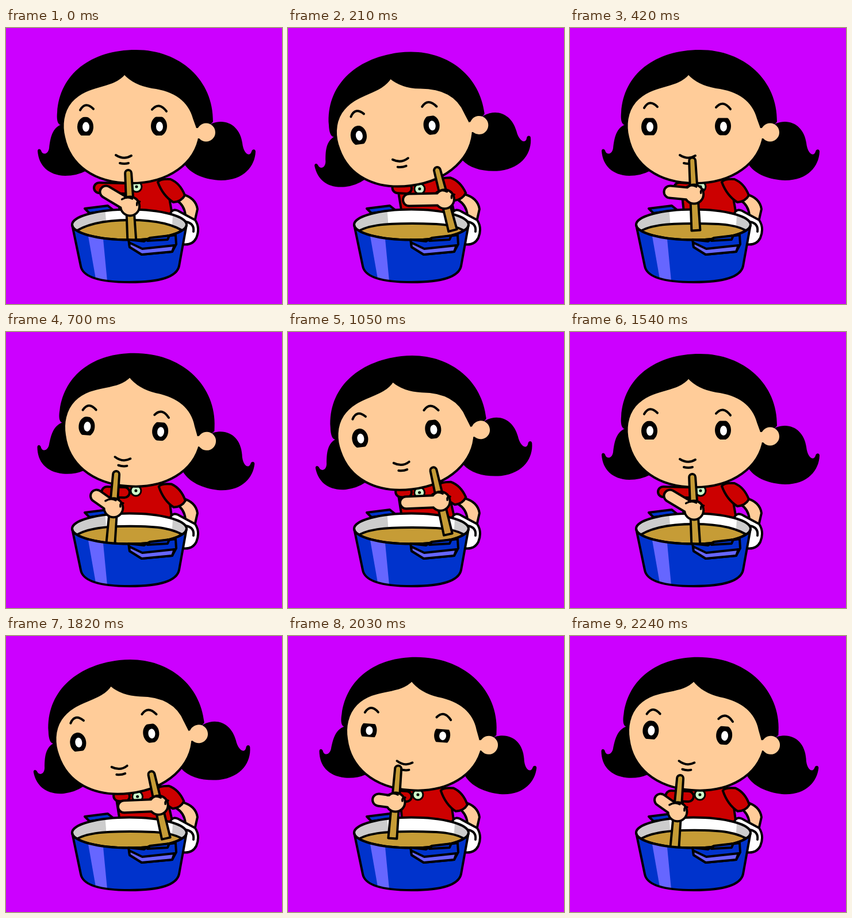
Write an HTML page that moves like this. It is 480 px wide and 480 px high and loops after 2310 ms.

```html
<!DOCTYPE html>
<html lang="en">
<head>
<meta charset="utf-8">
<title>Stirring the pot</title>
<style>
  html, body { margin: 0; width: 100%; height: 100%; overflow: hidden; background: #c0f; }
  svg { display: block; width: 100%; height: 100%; }
  .ink { stroke: #000; stroke-width: 4; stroke-linejoin: round; stroke-linecap: round; }
  .line { fill: none; }
  .skin { fill: #fc9; }
  .red { fill: #c00; }
  .blue { fill: #03c; }
  .light { fill: #66f; }
  .gold { fill: #c69c36; }
  .white { fill: #fff; }
  .limb { fill: none; stroke-linecap: round; }
</style>
</head>
<body>
<svg viewBox="0 0 480 480">
  <defs>
    <clipPath id="lids"><rect id="lidGap" x="100" width="200"/></clipPath>
    <clipPath id="rim"><ellipse cx="214.500" cy="342" rx="99" ry="26"/></clipPath>
  </defs>
  <rect width="480" height="480" fill="#c0f"/>

  <path class="ink skin" d="M306 289Q330 295 333 315L328 337L312 325Q310 308 297 300Z"/>
  <g id="torso">
    <path class="ink red" d="M192 262L199 330H290L283 290L270 262Z"/>
    <path class="ink red" d="M264 268Q268 262 286 263Q303 270 311 291Q305 302 291 303Q273 292 264 268Z"/>
  </g>
  <path id="sleeveInk" class="limb" stroke="#000" stroke-width="22"/>
  <path id="sleeve" class="limb" stroke="#c00" stroke-width="14"/>
  <g id="badge">
    <circle class="ink" r="9" fill="#cfc" style="stroke-width:3"/>
    <circle r="2.500"/>
  </g>

  <g id="head">
    <path d="M99 167C80 172 77 192 75 209C73 221 63 221 61 213C59 209 55 210 55 214C57 239 73 256 103 257Q123 257 138 249L125 190Z"/>
    <path d="M358 166C385 156 407 172 411 200C413 219 424 225 427 215C428 210 434 210 434 215C433 240 414 265 374 265C347 264 323 255 311 238L338 190Z"/>
    <path d="M97 169C89 169 88 158 89 147C93 80 148 38 226 38C303 38 361 91 360 163L340 185L115 185Z"/>
    <path class="ink skin" d="M206 79C184 106 142 95 113 128C98 146 96 170 101 190C111 238 153 270 217 270C283 270 330 235 337 186Q332 170 327 157C317 121 286 107 254 103C230 99 215 89 206 79Z"/>
    <circle class="skin" cx="348" cy="181.500" r="16"/>
    <path class="skin" d="M331 174H345V192H331Z"/>
    <path id="brows" class="ink line" d="M129 144Q138 128 152 142M254 143Q266 129 279 146"/>
    <g clip-path="url(#lids)">
      <ellipse cx="138" cy="172" rx="14" ry="17.500"/>
      <ellipse cx="266" cy="170.500" rx="14" ry="17.500"/>
    </g>
    <ellipse class="pupil white" cx="139" cy="172" rx="6"/>
    <ellipse class="pupil white" cx="267" cy="171.500" rx="6"/>
    <path class="ink line" d="M191 221Q205 230 218 222M198 235Q206 237 213 235"/>
  </g>

  <path class="ink white" d="M286 322Q291 312 303 320L329 334Q338 348 331 365Q324 379 306 376L295 340Z"/>
  <path class="ink line" d="M313 337Q328 340 326 354"/>
  <path class="ink blue" d="M137 314L177 309L187 317L145 322Z"/>
  <g clip-path="url(#rim)">
    <rect class="white" x="110" y="310" width="210" height="64"/>
    <path fill="#ccc" d="M110 310H172L177 374H110ZM291 310H320V374H287Z"/>
    <path id="soup" class="ink gold"/>
  </g>
  <ellipse class="ink line" cx="214.500" cy="342" rx="99.500" ry="26.500"/>
  <path id="stick" class="ink gold"/>
  <path id="pot" class="blue" d="M115 342A99.500 26.500 0 0 0 314 342L301 414Q295 442 215 442Q135 442 130 414Z"/>
  <path class="light" d="M143 362L169 367L176 440L156 436Z"/>
  <use href="#pot" class="ink" style="fill-opacity:0"/>
  <path class="ink blue" d="M213 368L215 381L236 394L289 389L296 376L295 360L248 366L240 371Z"/>
  <path class="ink light" d="M214 373L237 384L293 378L289 389L236 394L215 381Z"/>
  <path class="ink blue" d="M246 370L250 365L284 361L281 368Z"/>

  <path id="armInk" class="limb" stroke="#000" stroke-width="25"/>
  <circle id="fistInk" r="18.500"/>
  <path id="arm" class="limb" stroke="#fc9" stroke-width="17"/>
  <g id="fist">
    <circle class="skin" r="14.500"/>
    <path class="ink line" d="M-14 -12Q-5 -18 4 -13M17 -8Q11 -9 12 -2" style="stroke-width:3.500"/>
  </g>
</svg>
<script>
const STEP = 70, CYCLE = 11;
const $ = id => document.getElementById(id);
const put = (id, name, value) => $(id).setAttribute(name, value);
const mix = (a, b, u) => a + (b - a) * u;

// Cosine over one stir, highest at the given step; bump keeps only its upper half
const wave = (step, peak, times = 1) => Math.cos(2 * Math.PI * times * (step - peak) / CYCLE);
const bump = (step, peak, power = 1) => Math.max(0, wave(step, peak)) ** power;

function stickPath(x1, y1, x2, y2) {
  const len = Math.hypot(x2 - x1, y2 - y1);
  const nx = (y2 - y1) / len, ny = (x1 - x2) / len;
  const at = (x, y, w) => `${x + nx * w} ${y + ny * w}`;
  return `M${at(x2, y2, -7.5)}L${at(x1, y1, -5.5)}A5.5 5.5 0 0 1 ${at(x1, y1, 5.5)}L${at(x2, y2, 7.5)}Z`;
}

function drawHead(step, tilt) {
  const x = .36 * tilt - .136 * tilt ** 2, y = .016 * tilt ** 2;
  const lid = 17 - 6.5 * bump(step, 7.7, 2);
  put('head', 'transform', `translate(${x} ${y}) rotate(${tilt} 244 213)`);
  put('brows', 'transform', `translate(0 ${-3.5 - 3.5 * wave(step, 4)})`);
  put('lidGap', 'y', 171.5 - lid);
  put('lidGap', 'height', lid + Math.min(15.5, lid));
  document.querySelectorAll('.pupil').forEach(p => p.setAttribute('ry', Math.min(8.5, lid - 4)));
}

function drawBody(step, tilt) {
  put('torso', 'transform', `rotate(${tilt * .45} 240 320)`);
  put('badge', 'transform', `translate(${227 - tilt * .25} ${276 + Math.max(0, -tilt) / 2})`);
  const shoulder = 184 + 15 * wave(step, 6) - 9 * wave(step, 6, 2);
  const sleeve = `M206 279L${shoulder} 278`;
  put('sleeveInk', 'd', sleeve);
  put('sleeve', 'd', sleeve);
}

function drawStirring(step) {
  const side = wave(step, 3);
  const topX = 218.5 + 41 * side, topY = 242.5 + 12 * wave(step, 1);
  const tipX = 224.5 + 66 * side - 4 * wave(step, 3, 2), tipY = 352 + 20 * bump(step, 0);
  const fistX = mix(topX, tipX, .48), fistY = mix(topY, tipY, .48);
  const arm = `M${178.5 + 32 * side} ${285 + 14 * bump(step, 3)}L${fistX} ${fistY}`;
  const soup = 340 - 6 * bump(step, 0, 6);

  put('stick', 'd', stickPath(topX, topY, tipX, tipY));
  put('armInk', 'd', arm);
  put('arm', 'd', arm);
  for (const id of ['fist', 'fistInk']) put(id, 'transform', `translate(${fistX} ${fistY})`);
  put('soup', 'd', `M114 359C134 342 170 ${soup} 216 ${soup}S294 341 315 358V380H114Z`);
}

function draw(step) {
  const tilt = 7.6 * wave(step, 8.5) + .55 * wave(step, 8.5, 2) - .55;
  drawHead(step, tilt);
  drawBody(step, tilt);
  drawStirring(step);
}

const start = performance.now();
function tick() {
  draw(Math.floor((performance.now() - start) / STEP) % CYCLE);
  requestAnimationFrame(tick);
}
tick();
</script>
</body>
</html>
```
